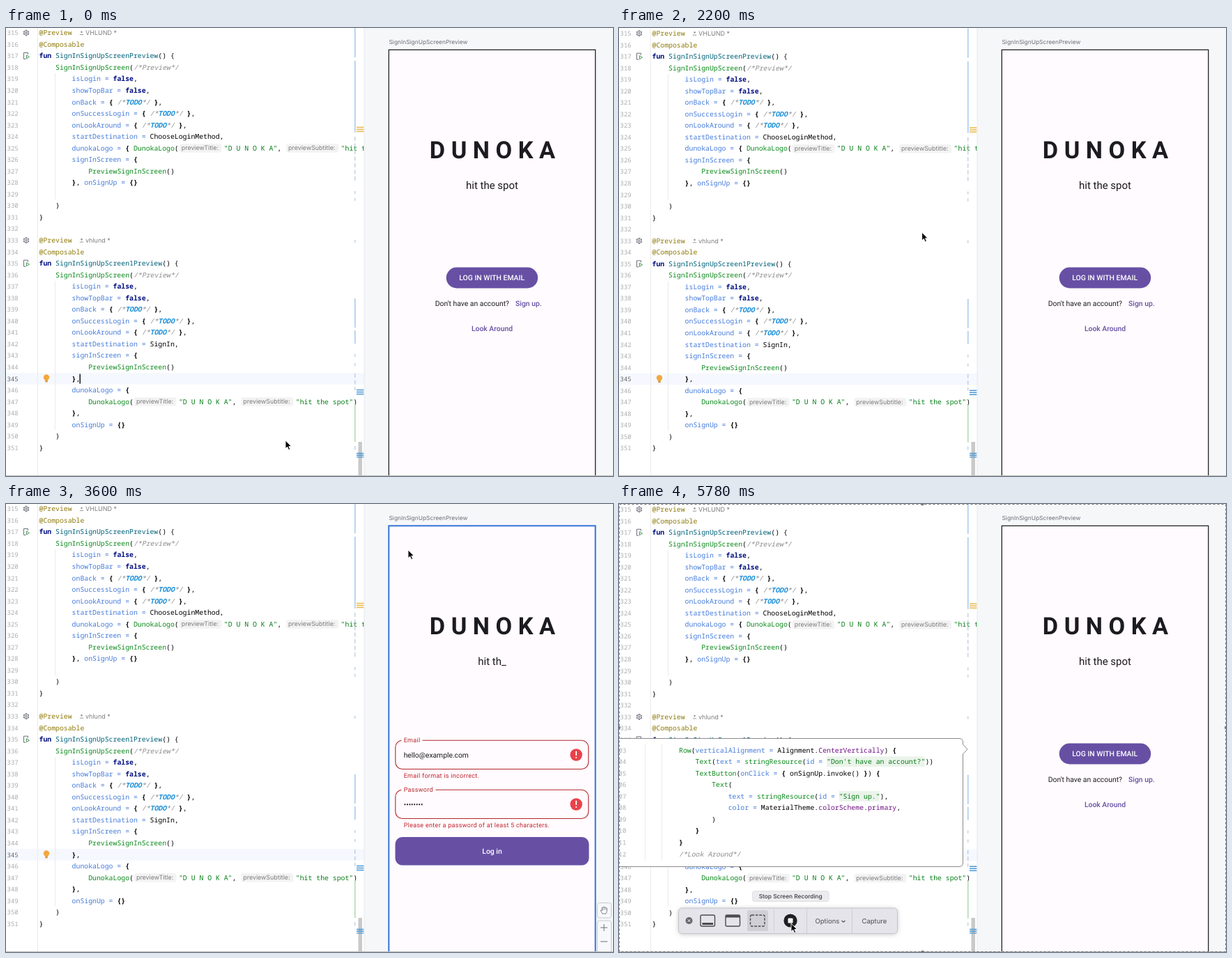
An HTML page for the animation above (5950 ms loop, 871x643 px).

```html
<!DOCTYPE html>
<html lang="en">
<head>
<meta charset="utf-8">
<title>Sign-in preview</title>
<style>
html, body { margin: 0; width: 100%; height: 100%; overflow: hidden; background: #fff; }
svg { display: block; }
text { white-space: pre; text-rendering: geometricPrecision; }
.code, .num { font-family: "Noto Sans Mono", monospace; }
.code { font-size: 9.82px; }
.num { font-size: 9px; fill: #adadad; }
.ui { font-family: Inter, sans-serif; }
.app { font-family: Roboto, sans-serif; }
</style>
</head>
<body>
<svg id="stage" width="871" height="643" viewBox="0 0 871 643"></svg>
<script>
const LOOP = 5950, CHAR = 5.89, ROW = 16.54;
const stage = document.getElementById('stage');

function add(parent, tag, attrs = {}, content) {
  const node = document.createElementNS('http://www.w3.org/2000/svg', tag);
  for (const key in attrs) node.setAttribute(key, attrs[key]);
  if (content !== undefined) node.textContent = content;
  parent.append(node);
  return node;
}
const group = (parent = stage) => add(parent, 'g');
const rect = (p, x, y, width, height, fill, more) => add(p, 'rect', { x, y, width, height, fill, ...more });
const path = (p, d, stroke, more) => add(p, 'path', { d, stroke, fill: 'none', ...more });
const circle = (p, cx, cy, r, fill) => add(p, 'circle', { cx, cy, r, fill });
const label = (p, x, y, size, fill, str, more) =>
  add(p, 'text', { x, y, 'font-size': size, fill, class: 'ui', ...more }, str);
const appText = (p, x, y, size, fill, str, more) =>
  label(p, x, y, size, fill, str, { class: 'app', ...more });
const MID = { 'text-anchor': 'middle' };
const MEDIUM = { 'font-weight': 500 };

// Code colouring: ^x switches to style x
const bold = { 'font-weight': 700 }, italic = { 'font-style': 'italic' };
const styles = {
  k: { fill: '#000f80', ...bold }, a: { fill: '#8f7a0a' }, f: { fill: '#00627a' },
  c: { fill: '#0c8a1c' }, n: { fill: '#467cda' }, i: { fill: '#8c8c8c', ...italic },
  t: { fill: '#1a8fd8', ...bold, ...italic }, s: { fill: '#067d17' }, r: { fill: '#067d17' },
  b: { fill: '#000', ...bold }, d: { fill: '#000' }, p: { fill: '#6f1284' }
};
const hintWidth = { 'previewTitle:': 65, 'previewSubtitle:': 79.5 };

function code(parent, x, y, line) {
  const indent = line.search(/\S/);
  const parts = line.trim().split(/\^(\w)/);
  x += indent * CHAR;
  for (let i = 1; i < parts.length; i += 2) {
    const kind = parts[i], str = parts[i + 1];
    if (kind === 'h') {
      const w = hintWidth[str];
      rect(parent, x + 1, y - 9.5, w - 4.5, 12.5, '#f3f3f3', { rx: 3 });
      label(parent, x + 4, y - .5, 8.9, '#7c7c7c', str);
      x += w;
      continue;
    }
    if (kind === 'r') rect(parent, x, y - 11, str.length * CHAR - 1, 15, '#ebf4ea');
    add(parent, 'text', { x, y, class: 'code', ...MEDIUM, ...styles[kind] }, str);
    x += str.length * CHAR;
  }
}

// Editor
const NAME = 'D U N O K A', TAGLINE = 'hit the spot';
const todo = name => `        ^n${name} = ^b{ ^i/*^tTODO^i*/ ^b}^d,`;
const head = (fn, dest) => [
  '^a@Preview', '^a@Composable', `^kfun ^f${fn}^d() {`,
  '    ^cSignInSignUpScreen^d(^i/*Preview*/',
  '        ^nisLogin = ^kfalse^d,', '        ^nshowTopBar = ^kfalse^d,',
  todo('onBack'), todo('onSuccessLogin'), todo('onLookAround'),
  `        ^nstartDestination = ^d${dest},`
];
const logo = `^cDunokaLogo^d(^hpreviewTitle:^s"${NAME}"^d, ^hpreviewSubtitle:^s"${TAGLINE}"^d)`;
const signIn = ['        ^nsignInScreen = ^b{', '            ^cPreviewSignInScreen^d()'];
const lines = [
  ...head('SignInSignUpScreenPreview', 'ChooseLoginMethod'),
  '        ^ndunokaLogo = ^b{ ' + logo, ...signIn,
  '        ^b}^d, ^nonSignUp = ^b{}', '', '    ^d)', '^d}', '',
  ...head('SignInSignUpScreen1Preview', 'SignIn'), ...signIn,
  '        ^b}^d,', '        ^ndunokaLogo = ^b{', '            ' + logo,
  '        ^b}^d,', '        ^nonSignUp = ^b{}', '    ^d)', '^d}'
];

rect(stage, 0, 0, 871, 643, '#fff');
const editor = group();
rect(editor, 0, 495, 514, 16.5, '#f5f8fe');
path(editor, 'M45.5 0V643M70.5 65V246M70.5 363V577', '#ebebeb');
lines.forEach((line, i) => {
  const y = 10.3 + i * ROW;
  add(editor, 'text', { x: 1.5, y, class: 'num', ...(i === 30 && { style: 'fill:#666' }) }, 315 + i);
  if (line) code(editor, 47.5, y, line);
});

function gutterIcons(y, author) {
  circle(editor, 29, y, 3.3, 'none').setAttribute('stroke', '#6c707e');
  circle(editor, 29, y, 1.3, 'none').setAttribute('stroke', '#6c707e');
  path(editor, `M29 ${y - 4.5}v9M25 ${y - 2.2}l8 4.4M25 ${y + 2.2}l8 -4.4`, '#6c707e',
    { 'stroke-dasharray': '1.2 6.6', 'stroke-width': 1.4 });
  const py = y + 33;
  path(editor, `M31.5 ${py - 2}v-2.5h-6v9h3`, '#6c707e');
  path(editor, `M29.5 ${py - 1}l4 2.5l-4 2.5z`, '#4f9d5a', { fill: '#f0f9f0' });
  circle(editor, 108.5, y - 1.3, 1.3, '#999');
  path(editor, `M105.8 ${y + 2.5}h5.4`, '#999');
  label(editor, 114, y + 3.4, 9, '#7c7c7c', author + ' *');
}
gutterIcons(7, 'VHLUND');
gutterIcons(304.7, 'vhlund');

path(editor, 'M500.8 0V42M500.8 47V150M500.8 388V430M500.8 434V453', '#abcbee', { 'stroke-width': 1.6 });
path(editor, 'M500.8 156V222M500.8 496V520', '#a9bdd3', { 'stroke-dasharray': '6 3.5' });
path(editor, 'M500.8 234v4M500.8 244v4M500.8 304v4M500.8 468v4M500.8 481v4M500.8 600v5', '#a9bdd3');
path(editor, 'M500.8 540V594', '#b3dcb0', { 'stroke-width': 1.6 });
const stripes = (y, color) => path(editor, `M503 ${y}h10.5m-10.5 3h10.5m-10.5 3h10.5`, color, { 'stroke-width': 1.5 });
stripes(142.5, '#e9b84a');
stripes(519.5, '#4b97d2');
const caret = rect(editor, 105.5, 496.5, 1.4, 14, '#000');
const bulb = group(editor);
circle(bulb, 58, 501.5, 4.2, '#f3a83c');
rect(bulb, 56.2, 505, 3.6, 3.5, '#d99a45', { rx: 1 });
rect(stage, 505.5, 594, 5.5, 49, '#c9c9c9');
path(stage, 'M503 610.5h10.5m-10.5 2.7h10.5m-10.5 2.7h10.5', '#4b97d2', { 'stroke-width': 1.4 });

// Preview panel
rect(stage, 514, 0, 357, 643, '#f6f7f9');
path(stage, 'M514 0V643', '#e6e8ec');
label(stage, 549.5, 23.3, 8.4, '#6c6f78', 'SignInSignUpScreenPreview');
const phone = rect(stage, 549.3, 31.3, 296.4, 630, '#fffbfe');
const title = appText(stage, 698, 187.3, 34.3, '#1c1b1f', NAME, { ...MID, 'font-weight': 700 });
const subtitle = appText(stage, 697.5, 231.3, 15, '#1c1b1f', TAGLINE, MID);
const arrow = path(stage, 'M576.5 55.6H565.5M570.8 50.2l-5.4 5.4l5.4 5.4', '#1c1b1f', { 'stroke-width': 1.5 });

const VIOLET = '#6750a4', RED = '#b3262a';
const choose = group();
const pill = { x: 631.7, y: 343.5, width: 131.5, height: 30, rx: 15 };
add(choose, 'rect', { ...pill, fill: VIOLET });
add(add(add(stage, 'defs'), 'clipPath', { id: 'pill' }), 'rect', pill);
const ripple = add(choose, 'circle', { cx: 662, cy: 367, r: 73, fill: '#000', opacity: .12, 'clip-path': 'url(#pill)' });
appText(choose, 697.2, 362.2, 10.4, '#fff', 'LOG IN WITH EMAIL', { ...MID, ...MEDIUM });
appText(choose, 615.7, 398.5, 10.4, '#1c1b1f', "Don't have an account?");
appText(choose, 731, 398.5, 10.4, VIOLET, 'Sign up.', MEDIUM);
appText(choose, 697.5, 434.7, 10.4, VIOLET, 'Look Around', { ...MID, ...MEDIUM });

const form = group();
function field(y, name, notch, value, error) {
  rect(form, 558.8, y, 277, 41.3, 'none', { rx: 10, stroke: RED, 'stroke-width': 1.1 });
  rect(form, 567.5, y - 2, notch, 4, '#fffbfe');
  const spaced = { 'letter-spacing': .3 };
  appText(form, 570.7, y + 2.8, 9, RED, name, spaced);
  appText(form, 570.7, y + 24.7, 10.3, '#1c1b1f', value);
  appText(form, 570.7, y + 53.8, 9, '#c0222a', error, spaced);
  circle(form, 818.2, y + 20.8, 8.7, '#e8424a');
  path(form, `M818.2 ${y + 15.6}v6.2M818.2 ${y + 23.8}v1.8`, '#fff', { 'stroke-width': 1.8 });
}
field(339.2, 'Email', 30, 'hello@example.com', 'Email format is incorrect.');
field(410.2, 'Password', 49, '••••••••', 'Please enter a password of at least 5 characters.');
rect(form, 558.5, 478, 278, 40.5, VIOLET, { rx: 10 });
appText(form, 697.5, 502, 10.4, '#fff', 'Log in', { ...MID, ...MEDIUM });

const tools = group();
const box = { rx: 3, stroke: '#c6c9d2' };
rect(tools, 848.5, 572.5, 20, 21.5, '#f7f8fa', box);
rect(tools, 848.5, 598, 20, 60, '#f7f8fa', box);
path(tools, 'M853 608h10M858 603v10M853 628h10', '#6c707e');

const HAND = 'M-2.5 6C-4 3 -6 1 -5.5 0S-3.5 0 -3 1L-3.5 -4C-3 -5.5 -1.5 -5 -1.3 -4C-1 -6.5 1 -6.5 1.2 -4.5C2 -6 3.6 -5 3.5 -3.5C4.5 -4.2 5.5 -3.5 5.3 -2C5.2 1 5 3 3.5 6Z';
const HAND_GAPS = 'M-1.3 -4V-.5M1.2 -4.5V-.5M3.5 -3.5V-.5';
path(tools, HAND, '#6c707e', { transform: 'translate(858 583) scale(.85)' });
path(tools, HAND_GAPS, '#6c707e', { transform: 'translate(858 583) scale(.85)', 'stroke-width': .8 });
path(stage, 'M0 642.5H871', '#bdbdbd');

// Diff popup
const popup = group();
path(popup, 'M-6 336.5H488Q493.5 336.5 493.5 342V345L500 352L493.5 359V515Q493.5 520.5 488 520.5H-6', '#8b8b8b', { fill: '#fff' });
path(popup, 'M37.5 345V512M61.5 345V512', '#ebebeb');
[
  '^cRow^d(^nverticalAlignment = ^dAlignment.^pCenterVertically^d) ^b{',
  '    ^cText^d(^ntext = ^cstringResource^d(^nid = ^r"Don\'t have an account?"^d))',
  '    ^cTextButton^d(^nonClick = ^b{ ^donSignUp.invoke() ^b}^d) ^b{',
  '        ^cText^d(',
  '            ^ntext = ^cstringResource^d(^nid = ^r"Sign up."^d),',
  '            ^ncolor = ^dMaterialTheme.^pcolorScheme^d.^pprimary^d,',
  '        ^d)', '    ^b}', '^b}', '^i/*Look Around*/'
].forEach((line, i) => {
  const y = 356.7 + i * ROW;
  add(popup, 'text', { x: -.5, y, class: 'num' }, String(i + 3).padStart(2, '0'));
  code(popup, 86, y, line);
});

// Recording controls
const recorder = group();
rect(recorder, .5, .5, 870, 642, 'none', { stroke: '#777', 'stroke-dasharray': '3 3' });
[[435.5, 0], [435.5, 643], [0, 321], [871, 321]].forEach(([x, y]) => circle(recorder, x, y, 2.2, '#777'));
rect(recorder, 85.5, 580, 314, 36.5, '#e4e4ea', { rx: 5, stroke: '#c4c4ca', style: 'filter:drop-shadow(0 1px 3px #0003)' });
circle(recorder, 100.5, 598, 5, '#68686c');
path(recorder, 'M98.7 596.2l3.6 3.6m0 -3.6l-3.6 3.6', '#fff');
rect(recorder, 184, 583, 30, 30, '#cfcfd5', { rx: 3 });
const frame = { rx: 2, stroke: '#4c4c50', 'stroke-width': 1.4 };
rect(recorder, 117, 590, 20.5, 16, 'none', frame);
rect(recorder, 119.5, 601, 15.5, 3, '#4c4c50');
rect(recorder, 153, 590, 20.5, 16, 'none', frame);
rect(recorder, 153, 590, 20.5, 3.5, '#4c4c50');
rect(recorder, 188.5, 590, 20.5, 16, 'none', { ...frame, 'stroke-dasharray': '3.6 1.8' });
path(recorder, 'M222.5 583V613M269.5 580V616M334.5 580V616', '#cdcdd3');
const stop = circle(recorder, 246, 598, 9.6, '#58585c');
rect(recorder, 242.5, 594.5, 7, 7, '#fff', { rx: 1 });
label(recorder, 281.5, 601.5, 9.5, '#4c4c50', 'Options');
path(recorder, 'M319.5 598l2.5 2l2.5 -2', '#4c4c50', { 'stroke-width': 1.2 });
label(recorder, 348.5, 601.5, 9.5, '#4c4c50', 'Capture');
const tip = group();
rect(tip, 191.5, 555.5, 109.5, 15, '#ececef', { rx: 3, stroke: '#e0e0e4' });
label(tip, 246.2, 566, 8.3, '#3c3c40', 'Stop Screen Recording', { ...MID, ...MEDIUM });

// Pointers
const pointer = add(stage, 'path', {
  d: 'M0 0V11.6L2.7 9.2L4.7 13.6L6.7 12.7L4.8 8.5H8.4Z', fill: '#000', stroke: '#fff', 'stroke-width': .9
});
const hand = group();
path(hand, HAND, '#111', { fill: '#fff' });
path(hand, HAND_GAPS, '#111', { 'stroke-width': .8 });

// Timeline: [time, ...values]
const route = [
  [0, 401, 592], [200, 425, 560], [500, 610, 420], [700, 661, 363], [1000, 661, 363],
  [1200, 630, 250], [1500, 572, 66], [1600, 570, 62], [1800, 524, 120], [2100, 352, 270],
  [2400, 600, 340], [2700, 724, 348], [3100, 724, 348], [3300, 660, 200], [3500, 578, 68],
  [3600, 577, 66], [3800, 530, 120], [4000, 503, 290], [4200, 505, 350], [4800, 505, 350],
  [5400, 247, 603], [5500, 247, 603], [5600, 247, 602]
];
const formLevel = [[1000, 0], [1200, 1], [1600, 1], [1800, 0], [3100, 0], [3300, 1], [3600, 1], [3800, 0]];

function track(keys, t) {
  const next = keys.findIndex(k => k[0] > t);
  if (next === 0) return keys[0].slice(1);
  if (next < 0) return keys[keys.length - 1].slice(1);
  const a = keys[next - 1], b = keys[next], f = (t - a[0]) / (b[0] - a[0]);
  return a.slice(1).map((v, i) => v + (b[i + 1] - v) * f);
}
const within = (t, ...spans) => spans.some(([from, to]) => t >= from && t < to);
const show = (node, on) => { node.style.display = on ? '' : 'none'; };

function typed(t) {
  const start = within(t, [620, 2000]) ? 620 : within(t, [2960, 4300]) ? 2960 : -Infinity;
  return Math.floor((t - start) / 37.5);
}

function render(time) {
  const t = Math.floor(time / 100) * 100;
  const n = typed(t), sub = n - NAME.length;
  title.textContent = sub < 0 ? NAME.slice(0, n) + '_' : NAME;
  subtitle.textContent = sub > 0 && sub < TAGLINE.length ? TAGLINE.slice(0, sub) + '_' : TAGLINE;

  const [level] = track(formLevel, t);
  form.setAttribute('opacity', level);
  choose.setAttribute('opacity', 1 - level);
  show(ripple, within(t, [1000, 1200], [3100, 3300]));
  show(arrow, within(t, [1000, 1600], [3100, 3600]));

  const hovered = within(t, [500, 1800], [2400, 3800]);
  phone.setAttribute('stroke', hovered ? '#3574d8' : '#111');
  phone.setAttribute('stroke-width', hovered ? 2 : 1.2);
  show(tools, within(t, [500, 1900], [2500, 3900]));

  const shifted = within(t, [1100, 2700], [3800, LOOP]);
  editor.setAttribute('transform', `translate(0 ${shifted ? .7 : 0})`);
  show(caret, t < 400);
  show(bulb, !within(t, [500, 800], [2700, 3300]));
  show(popup, t >= 4300);
  show(recorder, t >= 4600);
  recorder.setAttribute('opacity', t < 4700 ? .5 : 1);
  show(tip, t >= 5400);
  stop.setAttribute('fill', time >= 5780 ? '#1f1f23' : '#58585c');

  const place = `translate(${track(route, t).join(' ')})`;
  const grabbing = within(t, [4300, 4900]);
  pointer.setAttribute('transform', place);
  hand.setAttribute('transform', place);
  show(pointer, !grabbing);
  show(hand, grabbing);
}

const began = performance.now();
function loop() {
  render((performance.now() - began) % LOOP);
  requestAnimationFrame(loop);
}
loop();
</script>
</body>
</html>
```
